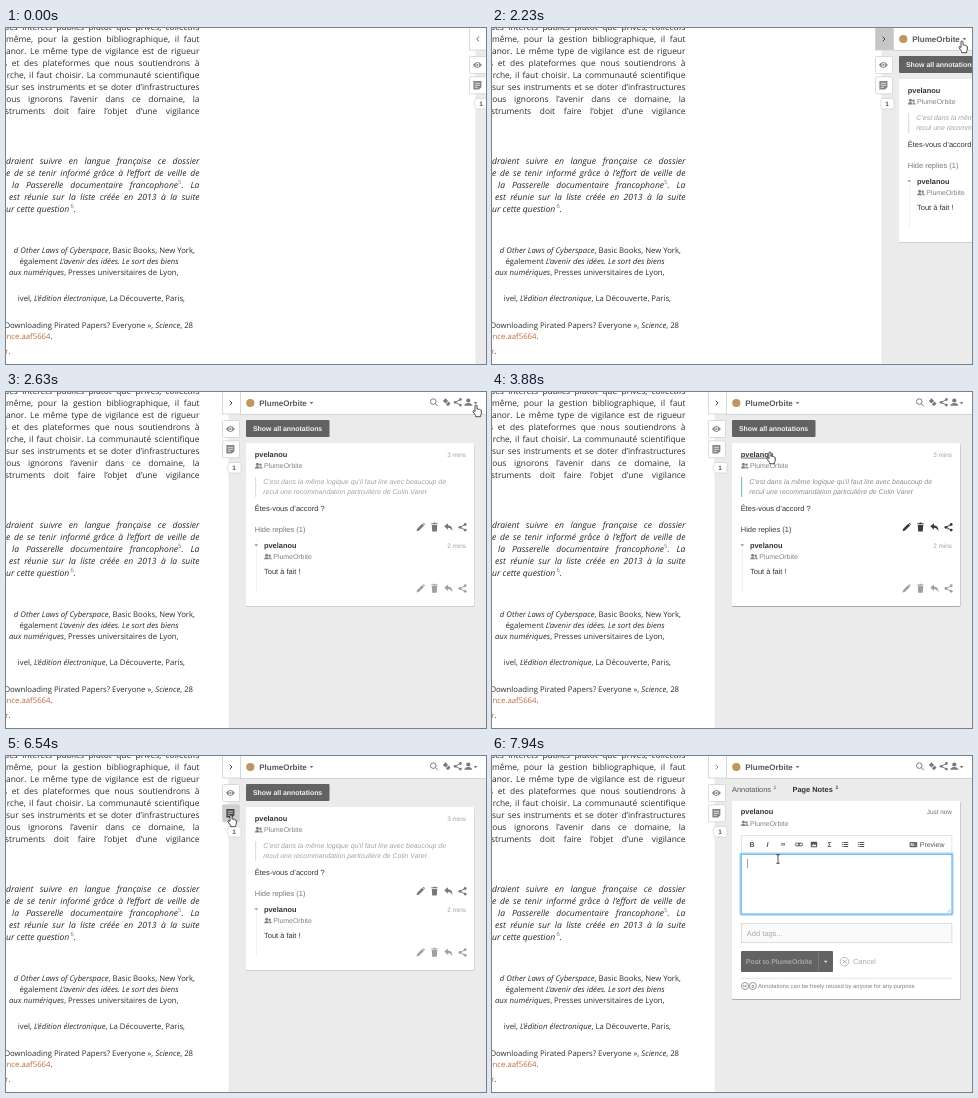
An HTML page for the animation above (8 s loop, 480x336 px).

```html
<!DOCTYPE html>
<html lang="fr">
<head>
<meta charset="utf-8">
<title>Annotation panel</title>
<style>
html, body { margin: 0; width: 100%; height: 100%; overflow: hidden; background: #fff; }
#stage { position: relative; width: 480px; height: 336px; overflow: hidden; }
svg { position: absolute; left: 0; top: 0; }
svg text { font-family: "Liberation Sans", Arial, sans-serif; text-rendering: geometricPrecision; }
.line { position: absolute; line-height: 12px; white-space: nowrap; color: #2b2b2b;
  font-family: "Open Sans", "Noto Sans", sans-serif; text-rendering: geometricPrecision; }
.full { display: flex; justify-content: space-between; font-size: 8.4px; }
.it { font-style: italic; font-size: 8.6px; }
.note { font-size: 7.75px; }
.line sup { font-size: .68em; line-height: 0; font-style: normal; color: #a5693f; }
.line a { color: #bd6a38; }
.stroke { fill: none; stroke: currentColor; stroke-width: 1; }
</style>
</head>
<body>
<div id="stage">
  <div id="article"></div>
  <svg width="480" height="336" viewBox="0 0 480 336">
    <g id="panel"></g>
    <g id="tip"></g>
    <g id="cursor"></g>
  </svg>
</div>
<script>
const LOOP = 8000;
const USER = 'pvelanou', GROUP = 'PlumeOrbite';
const $ = id => document.getElementById(id);

// ---------- article ----------
const line = (cls, base, pos, html) =>
  `<div class="line ${cls}" style="top:${base - 9.2}px;${pos}">${html}</div>`;
const full = (cls, base, x, s) => line('full ' + cls, base, `left:${x}px;width:${193.5 - x}px`,
  s.split(' ').map(w => `<span>${w}</span>`).join(''));
const note = (base, right, s) => line('note', base, `right:${480 - right}px`, s);

const body = [
  [-2, 'des intérêts publics plutôt que privés, collectifs'],
  [0, 'même, pour la gestion bibliographique, il faut'],
  [0, 'anor. Le même type de vigilance est de rigueur'],
  [-3, 's et des plateformes que nous soutiendrons à'],
  [-4, 'arche, il faut choisir. La communauté scientifique'],
  [0, 'sur ses instruments et se doter d’infrastructures'],
  [-5, 'nous ignorons l’avenir dans ce domaine, la'],
  [-1, 'struments doit faire l’objet d’une vigilance']
];
const italic = [
  [0, 'draient suivre en langue française ce dossier'],
  [0, 'e de se tenir informé grâce à l’effort de veille de'],
  [6, 'la Passerelle documentaire francophone<sup>5</sup>. La'],
  [3, 'est réunie sur la liste créée en 2013 à la suite']
];
$('article').innerHTML =
  body.map(([x, s], i) => full('', 3.3 + 12 * i, x, s)).join('') +
  italic.map(([x, s], i) => full('it', 136 + 12.1 * i, x, s)).join('') +
  line('it', 184.4, 'left:0', 'ur cette question<sup>&thinsp;6</sup>.') +
  note(226, 189, '<i>d Other Laws of Cyberspace</i>, Basic Books, New York,') +
  note(237.3, 172.5, 'également <i>L’avenir des idées. Le sort des biens</i>') +
  note(248.3, 172.5, '<i>aux numériques</i>, Presses universitaires de Lyon,') +
  note(274.5, 179, 'ivel, <i>L’édition électronique</i>, La Découverte, Paris,') +
  note(300.8, 187, 'Downloading Pirated Papers? Everyone », <i>Science</i>, 28') +
  note(312, 46.5, '<a>ence.aaf5664</a>.') +
  note(326.8, 4.5, '<a>r</a>.');

// ---------- drawing helpers ----------
const text = (x, y, s, size, fill, extra = '') =>
  `<text x="${x}" y="${y}" font-size="${size}" fill="${fill}" ${extra}>${s}</text>`;
const rect = (x, y, w, h, fill, extra = '') =>
  `<rect x="${x}" y="${y}" width="${w}" height="${h}" fill="${fill}" ${extra}/>`;
const BOLD = 'font-weight="bold"', ITALIC = 'font-style="italic"', END = 'text-anchor="end"';
const at = (x, y, color, shape) => `<g transform="translate(${x} ${y})" style="color:${color}" fill="currentColor">${shape}</g>`;

const icon = {
  search: '<circle cx="-.7" cy="-.7" r="2.8" class="stroke"/><path d="M1.3 1.3 4 4" class="stroke" stroke-width="1.5"/>',
  sort: '<path d="M-3.6 -1.4 -1 -4 1.6 -1.4 -1 1.2zM-.6 2 2.2 -.8 4 1.4 1.4 4z"/>',
  share: '<path d="M3 -3-2.5 0 3 3" class="stroke"/><circle cx="2.7" cy="-2.8" r="1.4"/><circle cx="-2.6" r="1.4"/><circle cx="2.7" cy="2.8" r="1.4"/>',
  user: '<circle cy="-1.8" r="2.1"/><path d="M-4 3.5Q-4 1 0 .6 4 1 4 3.5z"/>',
  caret: '<path d="M-1.9 -1h3.8L0 1.2z"/>',
  pencil: '<path d="M-4 4-3.3 1.4 1.7 -3.6 3.6 -1.7 -1.4 3.3zM2.3 -4.1 3 -4.6 4.6 -3 4.1 -2.3z"/>',
  trash: '<path d="M-2.7 -2.4h5.4l-.4 6.7h-4.6zM-3.2 -4h2l.4 -.7h1.6l.4 .7h2v1h-6.4z"/>',
  reply: '<path d="M-4.2 -1 -.6 -4v1.9Q4 -2 4 4 2.5 .6 -.6 .5v2z"/>',
  group: '<circle cx="-1.4" cy="-1.5" r="1.5"/><path d="M-4 2.6Q-4 .5 -1.4 .3 1 .5 1 2.6z"/><circle cx="1.7" cy="-1" r="1.2"/><path d="M1.6 2.6Q1.6 1.4 1 .6 3.8 .4 3.8 2.6z"/>',
  eye: '<path d="M-4.5 0Q0 -6 4.5 0 0 6 -4.5 0z"/><circle r="1.9" fill="#fff"/><circle r="1.1"/>',
  note: '<path d="M-4 -4.2h8v6.2l-2.4 2.3h-5.6z"/><path d="M-2.6 -2h5.2M-2.6 0h5.2M-2.6 2h3" stroke="#fff" stroke-width=".7"/>',
  link: '<rect x="-3.6" y="-1.4" width="4" height="2.8" rx="1.4" class="stroke"/><rect x="-.4" y="-1.4" width="4" height="2.8" rx="1.4" class="stroke"/>',
  image: '<rect x="-3.2" y="-2.7" width="6.4" height="5.4" rx=".6"/><path d="M-2.4 1.8-.6 -.4 .5 .7 1.5 -.3 2.5 1.8z" fill="#fff"/>',
  list: '<path d="M-1.4 -2h4.6M-1.4 0h4.6M-1.4 2h4.6M-3.2 -2h1M-3.2 0h1M-3.2 2h1" class="stroke"/>'
};
const groupLine = (x, y) => at(x + 4, y - 2.6, '#808080', icon.group) + text(x + 9.3, y, GROUP, 6.93, '#808080');
const actions = y => ['pencil', 'trash', 'reply', 'share']
  .map((k, i) => at(414.5 + 14 * i, y, 'currentColor', icon[k])).join('');
const card = (y, h, id) => rect(240, y + 1, 228.5, h, '#000', `id="${id}" opacity=".12" rx="1"`) +
  rect(240, y, 228, h, '#fff', 'rx="1"');

// ---------- panel parts, placed as when fully open ----------
const header =
  rect(234, 0, 260, 22, '#fff') + rect(234, 22, 260, .8, '#cfcfcf') +
  `<circle cx="244.3" cy="11" r="4.1" fill="#bf9560"/>` +
  text(253.2, 13.9, GROUP, 8, '#585858', BOLD) + at(305.5, 11, '#777', icon.caret) +
  at(428, 10.3, '#7a7a7a', icon.search) + at(440.5, 10.3, '#7a7a7a', icon.sort) +
  at(451.7, 10.3, '#7a7a7a', icon.share) + at(462.3, 10.3, '#7a7a7a', icon.user) + at(469.5, 11, '#7a7a7a', icon.caret);

const button = (y, id, kind) =>
  rect(216.5, y, 17, 17, '#fff', `id="${id}Box" stroke="#d2d2d2" stroke-width=".8" rx="1"`) +
  `<g id="${id}Icon" style="color:#858585">${at(224.4, y + 8.5, 'currentColor', icon[kind])}</g>`;
const toolbar =
  rect(216.4, -1, 18, 23, '#fff', 'id="cell" stroke="#cfcfcf" stroke-width=".8"') +
  '<path id="chevron" class="stroke" stroke-width="1.1"/>' +
  button(28.5, 'eye', 'eye') + button(48.8, 'note', 'note') +
  '<path d="M222.5 71.5q0 -1 1 -1h9.5q2 0 2 2v6.500q0 2 -2 2h-9q-1.500 0 -1.500 -1.500l-1.500 -4z" fill="#fff" stroke="#ccc" stroke-width=".6"/>' +
  text(228, 78.3, '1', 6.4, '#555', 'text-anchor="middle" ' + BOLD);

const thread =
  rect(240, 28, 83.5, 17, '#626262', 'rx="1"') + text(247, 39, 'Show all annotations', 6.93, '#f4f4f4', BOLD) +
  card(51, 163, 'threadShade') +
  text(248.8, 64.7, USER, 7.4, '#333', `id="author" ${BOLD}`) + text(460, 64.5, '3 mins', 6.4, '#a2a2a2', END) +
  groupLine(248.8, 76.4) +
  rect(249, 85, 1.2, 20, '#dedede', 'id="quoteBar"') +
  `<g id="quote" fill="#a3a3a3">` +
  text(257.3, 92, 'C’est dans la même logique qu’il faut lire avec beaucoup de', 6.93, 'inherit', ITALIC) +
  text(257.3, 102, 'recul une recommandation particulière de Colin Varet', 6.93, 'inherit', ITALIC) + '</g>' +
  text(248.8, 119, 'Êtes-vous d’accord ?', 7.47, '#333') +
  text(248.8, 139.6, 'Hide replies (1)', 7.47, '#777', 'id="hide"') +
  `<g id="acts">${actions(135.3)}</g>` +
  rect(250, 147, .6, 54, '#e9e9e9') + rect(248, 150, 5, 6, '#fff') + at(250.3, 153.3, '#999', icon.caret) +
  text(258, 155.7, USER, 7.4, '#333', BOLD) + text(460, 155.5, '2 mins', 6.4, '#a2a2a2', END) +
  groupLine(258, 167.3) + text(258, 181.9, 'Tout à fait !', 7.47, '#333') +
  `<g style="color:#a0a0a0">${actions(196.5)}</g>`;

const glyph = (x, s, extra = '') => text(x, 91, s, 7, '#555', `text-anchor="middle" ${BOLD} ${extra}`);
const editor =
  text(240, 35.6, 'Annotations', 7.4, '#555') + text(281.5, 32.9, '1', 5, '#555') +
  text(300.5, 35.6, 'Page Notes', 7.4, '#333', BOLD) + text(343.5, 32.9, '1', 5, '#333', BOLD) +
  card(45, 198, 'editShade') +
  text(248.8, 58.2, USER, 7.4, '#333', BOLD) + text(460, 58, 'Just now', 6.4, '#b2b2b2', `id="now" ${END}`) +
  groupLine(248.8, 70) +
  rect(249.3, 79.300, 210.6, 19, '#fff', 'stroke="#d9d9d9" stroke-width=".7"') +
  glyph(260, 'B') + glyph(275.5, 'I', ITALIC) + text(291, 94, '”', 10, '#555', 'text-anchor="middle" ' + BOLD) +
  at(307, 88.5, '#555', icon.link) + at(322, 88.5, '#555', icon.image) + glyph(337.5, 'Σ') +
  at(353, 88.5, '#555', icon.list) + at(369, 88.5, '#555', icon.list) +
  rect(417.6, 86, 7.6, 5.2, '#666', 'rx=".8"') + text(421.4, 90.3, 'M↓', 4.2, '#fff', 'text-anchor="middle" ' + BOLD) +
  text(427.8, 91.200, 'Preview', 6.93, '#555') +
  rect(248.4, 97.6, 212.2, 61.2, 'none', 'id="glow" stroke="#a9d5f5" stroke-width="2" rx="1"') +
  rect(249.3, 98.3, 210.6, 59.6, '#fafafa', 'id="area" stroke="#d0d0d0" stroke-width=".8"') +
  '<path d="M455 156.500l3.500 -3.500M457 156.500l1.500 -1.500" stroke="#888" stroke-width=".5"/>' +
  rect(255, 103, .7, 9, '#777', 'id="caret"') +
  rect(249.3, 167.3, 210.6, 19.4, '#fafafa', 'stroke="#d2d2d2" stroke-width=".7"') +
  text(254.800, 179.8, 'Add tags...', 7.47, '#aaa') +
  rect(249, 195, 92, 21, '#636363', 'rx="1"') + text(253.8, 208, 'Post to ' + GROUP, 6.93, '#a9a9a9', BOLD) +
  rect(326, 197, .7, 17, '#858585') + at(333.7, 205.7, '#ddd', icon.caret) +
  at(352.5, 205.700, '#a5a5a5', '<circle r="4.300" class="stroke" style="stroke-width:.8"/><path d="M-1.700 -1.700 1.700 1.700M1.700 -1.700-1.700 1.700" class="stroke"/>') +
  text(361, 208.3, 'Cancel', 7.4, '#aaa') +
  rect(249, 221.800, 211, .7, '#d6d6d6') +
  [253, 260.8].map(x => at(x, 230, '#808080', '<circle r="3.500" class="stroke" style="stroke-width:.8"/>')).join('') +
  text(253, 231.4, 'cc', 3.9, '#777', 'text-anchor="middle" ' + BOLD) + text(260.8, 231.6, '0', 4.600, '#777', 'text-anchor="middle" ' + BOLD) +
  text(266, 232.1, 'Annotations can be freely reused by anyone for any purpose', 5.87, '#808080');

$('panel').innerHTML = rect(222.5, 0, 280, 336, '#ebebeb') +
  `<g id="thread">${thread}</g><g id="editor">${editor}</g>` + header + toolbar;
$('tip').innerHTML = rect(224.4, 68.4, 46.2, 10.4, '#fff', 'stroke="#666" stroke-width=".8"') +
  text(227.8, 75.8, 'New Page Note', 5.75, '#333');

const pointer = {
  arrow: '<path d="M0 0V10.500L2.500 8.300 4.100 12 5.800 11.300 4.200 7.700H7.500z"/>',
  hand: '<path d="M-1 1Q-1 0 0 0 1 0 1 1V4.200Q2 3.600 2.600 4.400 3.600 4 4.100 4.900 5.300 4.700 5.400 5.700V8Q5.300 9.300 4.600 10.300V11.700H-.3V10.500L-2.800 7Q-3.400 6 -2.600 5.600 -1.900 5.400 -1 6.600z"/>',
  beam: '<path d="M-1.700 -4.300H1.700M0 -4.300V4.300M-1.700 4.300H1.700" fill="none"/>'
};
$('cursor').innerHTML = Object.keys(pointer)
  .map(k => `<g id="${k}" fill="#fff" stroke="#222" stroke-width=".8">${pointer[k]}</g>`).join('');

// ---------- motion ----------
const easeOut = p => 1 - (1 - p) ** 2;
const easeInOut = p => p < .5 ? 2 * p * p : 1 - 2 * (1 - p) ** 2;
// start, end, steps, from, to, easing
const moves = [
  [530, 1300, 11, [382, 325], [467, 27], easeOut],
  [1360, 1770, 6, [469, 25], [470, 13], easeOut],
  [3180, 3970, 11, [468, 14], [274, 61], easeInOut],
  [4040, 4740, 10, [273, 61], [225, 59], easeInOut],
  [7700, 7940, 4, [230, 62], [286, 103], easeOut]
];
const slide = [[0, 463], [2140, 446], [2230, 383], [2310, 304], [2380, 216]];
const stepAt = (table, t) => table.filter(r => r[0] <= t).pop();

function cursorAt(t) {
  const m = stepAt(moves, t);
  if (!m) return null;
  const [t0, t1, n, a, b, ease] = m;
  const k = Math.min(n - 1, Math.floor((t - t0) / (t1 - t0) * (n - 1) + .2));
  const p = ease(k / (n - 1));
  return [a[0] + (b[0] - a[0]) * p, a[1] + (b[1] - a[1]) * p];
}

const show = (id, on) => $(id).setAttribute('display', on ? 'inline' : 'none');
const set = (id, name, value) => $(id).setAttribute(name, value);

function draw(t) {
  const left = stepAt(slide, t)[1], open = left === 216, writing = t >= 6610, focused = t >= 6760;
  set('panel', 'transform', `translate(${left - 216} 0)`);

  const pos = cursorAt(t);
  const [x, y] = pos || [-50, -50];
  const overCard = open && x > 240 && x < 468 && y > (writing ? 45 : 51);
  const overName = overCard && !writing && x < 284 && y < 67;
  const overNote = open && x < 234 && y > 48 && y < 66;
  const overToggle = t >= 1360 && t < 3180 && y < 23;
  const kind = writing && y > 98 ? 'beam' : overName || overNote || overToggle ? 'hand' : 'arrow';
  show('cursor', pos);
  set('cursor', 'transform', `translate(${x} ${y})`);
  for (const k in pointer) show(k, k === kind);

  const toggled = t >= 2060;
  set('cell', 'fill', !toggled || t >= 2630 ? '#fff' : t < 2550 ? '#c6c6c6' : '#e3e3e3');
  set('chevron', 'd', left < 440 ? 'M223.700 8.700 226 11 223.700 13.300' : 'M226 8.700 223.700 11 226 13.300');
  $('chevron').style.color = writing ? '#909090' : t >= 1440 ? '#444' : '#666';

  const pressed = t >= 6540 && t < 7000;
  set('noteBox', 'fill', !pressed ? '#fff' : t < 6910 ? '#cecece' : '#e8e8e8');
  $('noteIcon').style.color = overNote && (t < 6910 || pressed) ? '#444' : '#858585';
  show('tip', t >= 5290 && t < 6540);

  show('thread', !writing);
  show('editor', writing);
  set('author', 'text-decoration', overName ? 'underline' : 'none');
  set('threadShade', 'opacity', overCard ? .28 : .12);
  set('quoteBar', 'fill', overCard ? '#8bbfae' : '#dedede');
  set('quote', 'fill', overCard ? '#8c8c8c' : '#a3a3a3');
  set('hide', 'fill', overCard ? '#3a3a3a' : '#777');
  $('acts').style.color = overCard ? '#3a3a3a' : '#777';

  set('editShade', 'opacity', overCard ? .28 : .12);
  set('now', 'fill', overCard ? '#707070' : '#b2b2b2');
  show('glow', focused);
  set('area', 'stroke', focused ? '#51a7e8' : '#d0d0d0');
  set('area', 'fill', focused ? '#fff' : '#fafafa');
  show('caret', focused && (t < 7240 || t >= 7700));
}

function frame() {
  draw(performance.now() % LOOP);
  requestAnimationFrame(frame);
}
frame();
</script>
</body>
</html>
```
